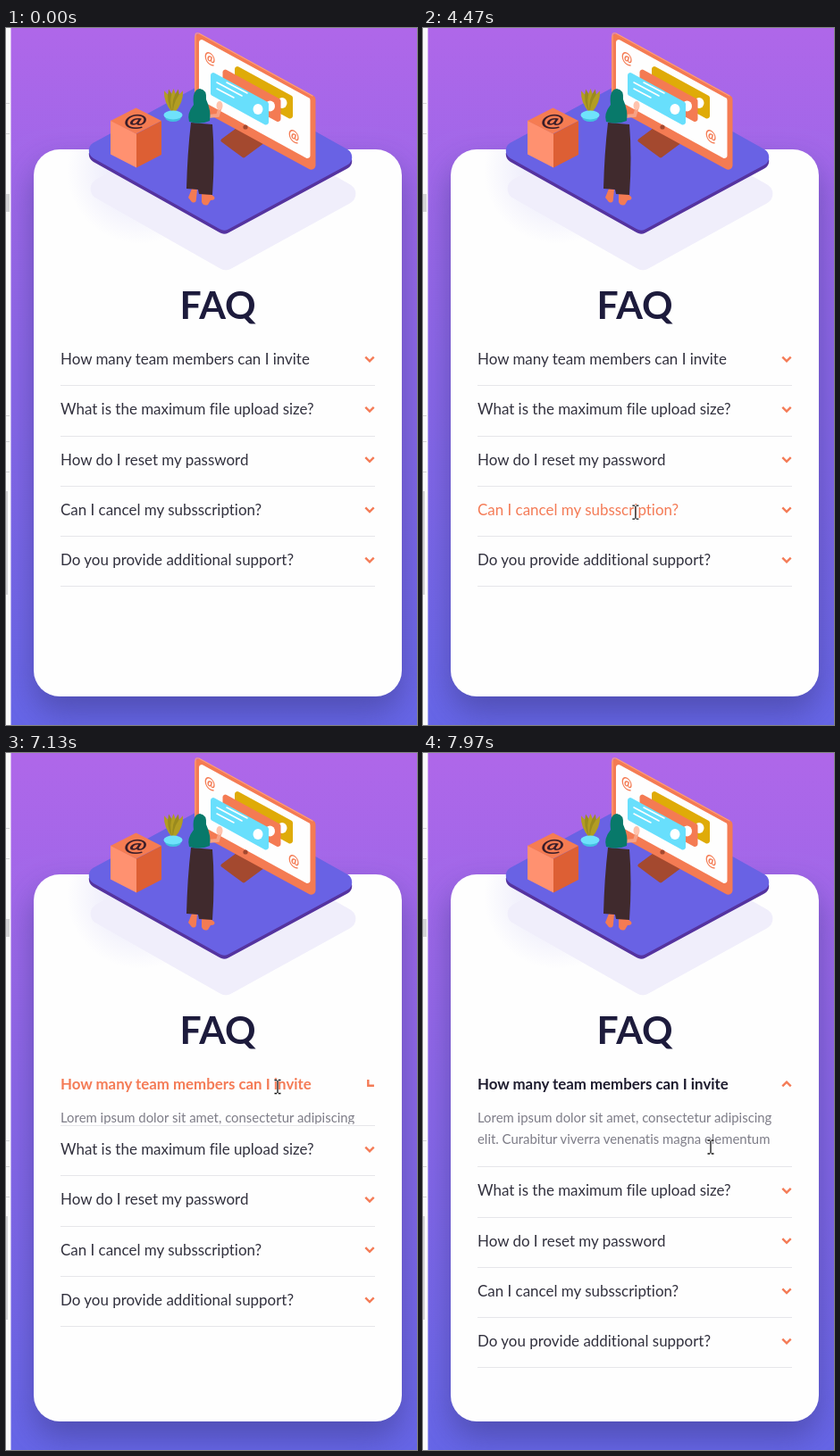
Write an HTML page with a canvas that moves like this. It is 460 px wide and 781 px high and loops after 8 s.

```html
<!DOCTYPE html>
<html lang="en">
<head>
<meta charset="utf-8">
<title>FAQ accordion</title>
<style>
  html, body { margin: 0; width: 100%; height: 100%; overflow: hidden; }
  canvas, svg { position: absolute; left: 0; top: 0; width: 460px; height: 781px; }
  text { font-family: Lato, "Open Sans", sans-serif; font-variant-ligatures: none; white-space: pre; }
  .title { font-size: 42.8px; font-weight: 700; fill: #1d1b3c; text-anchor: middle; }
  .question { font-size: 16.95px; fill: #32313e; }
  .question.open { font-size: 16.85px; font-weight: 700; fill: #1d1b2e; }
  .question.hover { fill: #f47b56; }
  .answer { font-size: 14.9px; fill: #7d7c87; }
  .rule { stroke: #e6e6ea; }
  .chevron { fill: none; stroke: #f47b56; stroke-width: 2.4; }
</style>
</head>
<body>
<canvas id="scene" width="460" height="781"></canvas>
<svg id="ui" viewBox="0 0 460 781">
  <defs><clipPath id="fold"><rect id="foldBox" x="55" y="399" width="370" height="0"/></clipPath></defs>
  <text class="title" x="237" y="326">FAQ</text>
  <g clip-path="url(#fold)">
    <text class="answer" x="61" y="414">Lorem ipsum dolor sit amet, consectetur adipiscing</text>
    <text class="answer" x="61" y="438">elit. Curabitur viverra venenatis magna elementum</text>
  </g>
  <g id="rows"></g>
  <path id="arrow" d="M0 0V16.6L3.9 13 6.6 19 9 18 6.4 12.1H11.8Z" fill="#fff" stroke="#111"/>
  <g id="beam" fill="none">
    <path d="M-3.5 -7.5H3.5M0 -7.5V7.5M-3.5 7.5H3.5" stroke="#fff" stroke-width="2.6" opacity=".7"/>
    <path d="M-3.5 -7.5H-.8M.8 -7.5H3.5M0 -7V7M-3.5 7.5H-.8M.8 7.5H3.5" stroke="#111" stroke-width="1.3"/>
  </g>
</svg>
<script>
const $ = id => document.getElementById(id);
const clamp = v => Math.min(1, Math.max(0, v));
const lerp = (a, b, s) => a + (b - a) * s;

// ---------- still scene ----------
const ctx = $('scene').getContext('2d');
const ORANGE = '#f47b53', PAPER = '#fefefe';

function fillPoly(color, points, radius) {
  const n = points.length, [a, b] = [points[n - 1], points[0]];
  ctx.beginPath();
  ctx.moveTo((a[0] + b[0]) / 2, (a[1] + b[1]) / 2);
  points.forEach((p, i) => {
    const next = points[(i + 1) % n];
    ctx.arcTo(p[0], p[1], (p[0] + next[0]) / 2, (p[1] + next[1]) / 2, radius);
  });
  ctx.closePath();
  ctx.fillStyle = color;
  ctx.fill();
}
// Flat isometric tile, slightly turned by tilt
function tile(color, x, y, rx, ry, radius = 0, tilt = 0) {
  fillPoly(color, [[x - rx, y - tilt], [x - tilt, y - ry], [x + rx, y + tilt], [x + tilt, y + ry]], radius);
}
// Upright isometric panel
function panel(color, x, y, w, h, radius = 0, slope = .547) {
  const drop = w * slope;
  fillPoly(color, [[x, y], [x + w, y + drop], [x + w, y + drop + h], [x, y + h]], radius);
}
function fillPath(color, d) {
  ctx.fillStyle = color;
  ctx.fill(new Path2D(d));
}
function strokePath(color, width, d) {
  ctx.strokeStyle = color;
  ctx.lineWidth = width;
  ctx.lineCap = 'round';
  ctx.stroke(new Path2D(d));
}
function oval(color, x, y, rx, ry = rx) {
  ctx.beginPath();
  ctx.ellipse(x, y, rx, ry, 0, 0, 7);
  ctx.fillStyle = color;
  ctx.fill();
}
function atSign(color, size, ...matrix) {
  ctx.save();
  ctx.transform(...matrix);
  ctx.font = `700 ${size}px Lato, sans-serif`;
  ctx.textAlign = 'center';
  ctx.textBaseline = 'middle';
  ctx.fillStyle = color;
  ctx.fillText('@', 0, 0);
  ctx.restore();
}

function drawBackdrop() {
  const sky = ctx.createLinearGradient(0, 0, 0, 781);
  sky.addColorStop(0, '#af67e9');
  sky.addColorStop(1, '#6565e7');
  ctx.fillStyle = sky;
  ctx.fillRect(0, 0, 460, 781);

  ctx.save();
  ctx.shadowColor = 'rgba(54,53,126,.5)';
  ctx.shadowBlur = 36;
  ctx.shadowOffsetY = 18;
  ctx.beginPath();
  ctx.roundRect(31, 136, 412, 613, 29);
  ctx.fillStyle = PAPER;
  ctx.fill();
  ctx.shadowColor = 'transparent';
  ctx.clip();
  const haze = ctx.createRadialGradient(150, 160, 10, 150, 160, 82);
  haze.addColorStop(0, 'rgba(105,98,230,.16)');
  haze.addColorStop(1, 'rgba(105,98,230,0)');
  ctx.fillStyle = haze;
  ctx.fillRect(50, 130, 200, 130);
  ctx.restore();
}

function drawWindowEdge() {
  ctx.fillStyle = '#fafafa';
  ctx.fillRect(0, 0, 5.5, 781);
  ctx.fillStyle = '#d4d4d6';
  for (const y of [84, 118, 434, 463, 497]) ctx.fillRect(0, y, 4, 1);
  ctx.fillRect(0, 186, 4, 20);
  ctx.fillRect(0, 519, 2, 116);
}

function drawPlate() {
  tile('#f0eefb', 243, 183, 161, 90, 12, 3);
  tile('#55339f', 240, 145, 158, 87, 10, 4);
  tile('#6962e4', 240, 141, 158, 87, 10, 4);
}

function drawMonitor() {
  tile('#a4492f', 266, 126, 27, 20, 2);
  panel(ORANGE, 211, 3, 135.5, 85, 5);
  panel(PAPER, 216, 11, 124.5, 69, 3);
  strokePath('#ff9d7b', 1.2, 'M212 84V8Q212 5 216 6L343 76');
  oval('#a4492f', 268, 111, 2.6);

  ['#dfab08', ORANGE, '#68dffc'].forEach((color, i) => {
    const x = 256 - 13.5 * i, y = 41 + 3.5 * i;
    panel(color, x, y, 65, 27, 3);
    oval('#fff', x + 53, y + 43, 5.5, 6);
  });
  strokePath('#fff', 1.6, 'M236 61L264 76M236 68L255 78M247 61L270 73');
  atSign(ORANGE, 17, .85, .45, 0, 1, 228, 34);
  atSign(ORANGE, 17, .85, .45, 0, 1, 322, 121);
}

function drawCube() {
  panel('#ff9170', 117, 103.5, 29, 38, 0, .52);
  panel('#dd5f34', 146, 118.5, 28, 38, 0, -.52);
  tile('#f57c52', 145.5, 104, 28.5, 14.5);
  atSign('#3a1d29', 30, 1, .04, -.2, .66, 145, 104.5);
}

function drawPlant() {
  for (let i = -2; i <= 2; i++) {
    ctx.save();
    ctx.translate(187.5, 95);
    ctx.rotate(i * .2);
    fillPath(i % 2 ? '#9a8a1e' : '#b29d22', 'M-1 0Q-6 -15 0 -27Q6 -15 1 0Z');
    ctx.restore();
  }
  oval('#43bfe0', 187, 99.5, 9, 5.5);
  oval('#6fe2fb', 187, 97.5, 10.5, 5);
}

function drawWoman() {
  strokePath('#f7a184', 4, 'M226 99L237 98L240 88');
  oval('#ffc3ad', 239, 87, 3.5, 5);
  fillPath(ORANGE, 'M208 180L214 181L213 191Q213 197 208 195L204 190Z');
  fillPath(ORANGE, 'M219 184L226 184L233 189Q235 193 229 193L226 198Q221 200 219 195Z');
  fillPath('#402a2d', 'M207 106L231 108Q234 144 231 187L216 186L215 181L202 180Q203 140 207 106Z');
  fillPath('#08796a', 'M217 68Q225 69 224 80Q230 93 228 104Q217 109 205 105Q202 96 210 86Q208 69 217 68Z');
}

drawBackdrop();
drawWindowEdge();
drawPlate();
drawMonitor();
drawCube();
drawPlant();
drawWoman();

// ---------- accordion ----------
const questions = [
  'How many team members can I invite',
  'What is the maximum file upload size?',
  'How do I reset my password',
  'Can I cancel my subsscription?',
  'Do you provide additional support?'
];
function add(parent, tag, attrs = {}) {
  const el = document.createElementNS(parent.namespaceURI, tag);
  for (const key in attrs) el.setAttribute(key, attrs[key]);
  return parent.appendChild(el);
}
const rows = questions.map(question => {
  const group = add($('rows'), 'g');
  const label = add(group, 'text', { class: 'question', x: 61 });
  label.textContent = question;
  return {
    label,
    chevron: add(group, 'path', { class: 'chevron', d: 'M-4.7 -2.3L0 2.4L4.7 -2.3' }),
    rule: add(group, 'path', { class: 'rule', d: 'M61 .5H413' })
  };
});

// ---------- motion ----------
const LOOP = 8000, STEP = 70, ROW = 56.25, ROW_Y = 371;
const CLICK = 6780, SPIN = 1120, ANSWER = 63;
const snap = (time, start) => Math.floor((time - start) / STEP) * STEP;

// The pointer rests at each stop until the next move begins
const stops = [
  { from: 0, to: 0, x: 472, y: 545 },
  { from: 660, to: 1150, x: 292, y: 355 },
  { from: 1550, to: 2030, x: 246, y: 434 },
  { from: 2710, to: 2990, x: 241, y: 483 },
  { from: 3190, to: 3530, x: 240, y: 494 },
  { from: 3730, to: 4270, x: 238, y: 536 },
  { from: 4470, to: 5090, x: 237, y: 602 },
  { from: 5680, to: 6460, x: 304, y: 374 },
  { from: 7620, to: 7690, x: 301, y: 375.5 },
  { from: 7760, to: 7970, x: 322, y: 441.5 }
];

function pointerAt(time) {
  const i = stops.findLastIndex(stop => time >= stop.from);
  const stop = stops[i], last = stops[Math.max(0, i - 1)];
  const s = clamp((snap(time, stop.from) + STEP) / (stop.to - stop.from + STEP));
  return { x: lerp(last.x, stop.x, s), y: lerp(last.y, stop.y, s) };
}
function place(el, x, y, angle = 0) {
  el.setAttribute('transform', `translate(${x} ${y}) rotate(${angle})`);
}
function show(el, visible) {
  el.setAttribute('visibility', visible ? 'visible' : 'hidden');
}

function render(time) {
  const { x, y } = pointerAt(time);
  const isOpen = time >= CLICK;
  const turn = clamp((snap(time, CLICK) - STEP) / SPIN);
  const fold = Math.min(ANSWER, 67 * turn);
  let overText = fold > 0 && y > 400 && y < 399 + fold;

  rows.forEach(({ label, chevron, rule }, i) => {
    const shift = i * ROW + (i ? fold : 0);
    const hover = x >= 61 && x <= 345 && Math.abs(y - ROW_Y - shift) <= 13;
    overText ||= hover;
    label.setAttribute('class', 'question' + (isOpen && !i ? ' open' : '') + (hover ? ' hover' : ''));
    label.setAttribute('y', ROW_Y + 6 + Math.round(shift));
    place(chevron, 407, ROW_Y + shift, i ? 0 : 180 * turn);
    place(rule, 0, Math.round(400.3 + i * ROW + fold));
  });
  $('foldBox').setAttribute('height', fold);

  place($('arrow'), x, y);
  place($('beam'), x, y);
  show($('arrow'), !overText);
  show($('beam'), overText);
}

function tick() {
  render(performance.now() % LOOP);
  requestAnimationFrame(tick);
}
tick();
</script>
</body>
</html>
```
